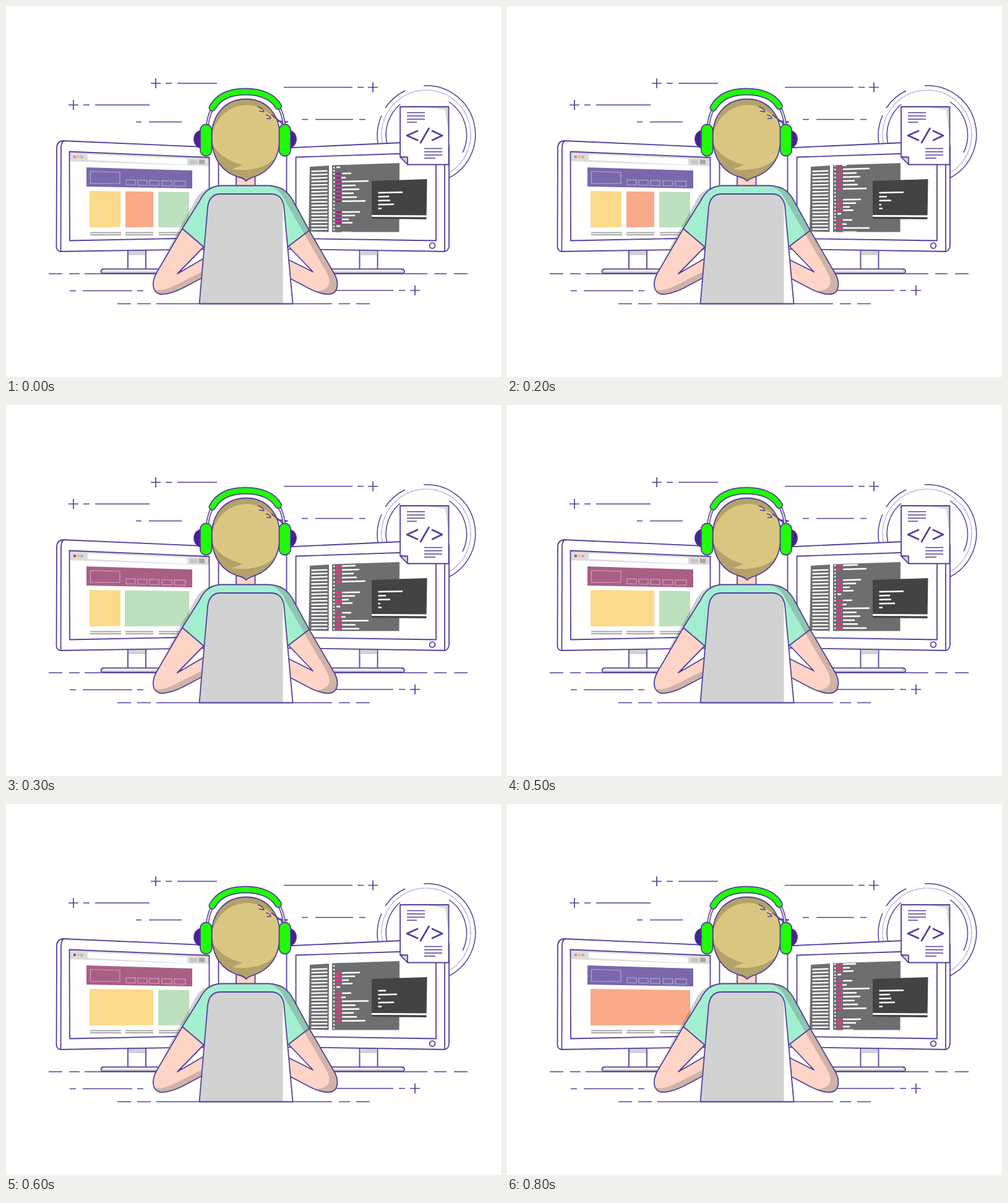
An HTML page that plays this animation: 800 px wide and 600 px high, repeating every 900 ms.

```html
<!DOCTYPE html>
<html lang="en">
<head>
<meta charset="utf-8">
<title>Developer at work</title>
<style>
html, body { margin: 0; width: 100%; height: 100%; overflow: hidden; background: #fff; }
svg { display: block; width: 100%; height: 100%; }
.ink { fill: none; stroke: #52409a; stroke-width: 1.8; stroke-linejoin: round; }
.dash { stroke-width: 1.7; }
.white { fill: #fff; }
.skin { fill: #fdd4c6; }
.shirt { fill: #a2efcf; }
.grey { fill: #d1d2d2; }
.green { fill: #21fb07; }
.shade { fill: #58595b; fill-opacity: .28; }
</style>
</head>
<body>
<svg viewBox="0 0 800 600">
  <defs>
    <clipPath id="editor"><path d="M527 257.5L636 254 635.5 365.5H527Z"/></clipPath>
    <clipPath id="hair"><path id="hairShape" d="M388 150.500C421 150.500 442.500 175 442.500 211C442.500 249 424 268 402 276Q392 279 388 283Q384 278 374 276C351 269 332.500 248 332.500 211C332.500 175 355 150.500 388 150.500Z"/></clipPath>
  </defs>

  <path id="dashes" class="ink dash"/>

  <g class="ink" style="stroke-width:1.5">
    <path d="M675 129A79 79 0 0 1 716 278M601 222A79 79 0 0 1 607 177M613 165A79 79 0 0 1 645 137"/>
    <path d="M615.500 222A65 65 0 0 1 637 159M716 155A65 65 0 0 1 738 237"/>
    <circle cx="679" cy="208" r="72" stroke-dasharray="1.2 1.6" stroke-width="1.2"/>
  </g>

  <!-- left monitor -->
  <g class="ink">
    <path class="white" d="M197 394H226V427H197Z"/>
    <path class="grey" stroke="none" d="M198 396H225V403H198Z"/>
    <rect class="grey" x="153.500" y="425.500" width="130" height="7" rx="3.500"/>
    <path class="white" stroke="none" d="M158 426.500H270V429H157Z"/>
    <path class="white" d="M92 218L343.500 229V393L88 397Q82 396 81.500 390L82 230Q82 219 92 218ZM93 218Q89 222 89 229L88.500 397"/>
  </g>
  <path fill="#dcdcdc" d="M103 236L328 245V259L103 251Z"/>
  <path fill="#fff" d="M132 240L293 247V257L132 249Z"/>
  <path fill="#c6c6c6" d="M297 249L309 249.500V256L297 255.500Z"/>
  <path fill="#a7a7a7" d="M312 248.500L321 249V256L312 255.500Z"/>
  <circle cx="117" cy="244" r="2.300" fill="#ecc176"/>
  <circle cx="122.500" cy="244.200" r="2.300" fill="#aabb9c"/>
  <g id="page"></g>
  <path class="ink" d="M102.500 235.500L328.500 245V375L103 379.500Z"/>

  <!-- right monitor -->
  <g class="ink">
    <path class="white" d="M571.500 394H600.500V427H571.500Z"/>
    <path class="grey" stroke="none" d="M572.500 396H599.500V403H572.500Z"/>
    <rect class="grey" x="500" y="425.500" width="144" height="7" rx="3.500"/>
    <path class="white" stroke="none" d="M501 426.500H639V429H501Z"/>
    <path class="white" d="M453.500 229.500L706 218Q716 219 716 230V388Q715 396 709 397L453.500 393ZM709 230V397"/>
    <path d="M468.500 244.500L695 237V379.500L468.500 376Z"/>
    <circle cx="689" cy="387.500" r="4.400"/>
  </g>
  <path fill="#6d6e70" d="M491 260L522 258 521.500 365.500 489 364.500ZM527 257.500L636 254 635.500 365.500H527Z"/>
  <path id="sidebar" stroke="#fff" stroke-width="2.300"/>
  <g id="code" clip-path="url(#editor)"></g>
  <path fill="#434344" d="M591 283L680.500 280 679.500 345 591 344Z"/>
  <path stroke="#fff" stroke-width="3" d="M591 339.500L680 340"/>
  <g id="terminal"></g>

  <!-- code document -->
  <path class="white" d="M637 163H715V257H650L637 244Z"/>
  <path fill="#d6d6d6" d="M682 164H715V206L710 168Z"/>
  <g class="ink">
    <path d="M637 163H715.500V256.500H650L637 244Z"/>
    <path class="grey" d="M637 244L649 244.500V256.500Z"/>
    <path id="docLines" stroke-width="1.500"/>
    <path style="stroke-width:2.700" d="M666 201.500L648 209.500 666 217.500M684 197L669.500 222M688 201.500L705 209.500 688 217.500"/>
  </g>

  <!-- body -->
  <path class="shade" d="M345 290C325 291 311 302 304 318L262 393 268 391 286 360 314 315C320 302 330 294 345 290Z"/>
  <g class="ink">
    <path class="skin" d="M372 272H402.500V292H372Z"/>
    <path class="skin" d="M285 360L243 432C235 447 236 463 249 466C262 467 276 461 286 456L320 438V408L277 433 320 389Z"/>
    <path class="skin" d="M490 363L530 432C539 447 537 465 523 466C511 467 500 462 490 457L456 439V410L496 430 456 388Z"/>
    <path class="shirt" d="M347 290.500H424C447 291 457 302 465 317L490 363 456 389 420 350H350L320 390 285 360 313 315C320 301 329 292 347 290.500Z"/>
  </g>
  <path class="shade" d="M240 459C252 462 264 456 277 450L318 429V438L286 456C274 462 260 467 249 466Q242 464 240 459Z"/>
  <path class="shade" d="M424 290.500C447 291 457 302 465 317L530 432C539 447 537 465 523 466C513 467 506 464 502 461C527 459 526 444 516 427L452 317C447 305 440 296 424 290.500Z"/>
  <path class="grey" d="M313 481L326 325C328 310 335 304 347 304H428C441 304 446 311 448 322L463 481Z"/>
  <path class="white" d="M447.500 313V481H463Z"/>
  <path class="ink" d="M312.500 481.500L326 325C328 310 335 304 347 304H428C441 304 446 311 449 322L463.500 481.500Z"/>

  <!-- head -->
  <use href="#hairShape" fill="#b3a26a"/>
  <path clip-path="url(#hair)" fill="#d9c781" d="M332 212C338 180 362 160 390 160C416 161 430 178 444 190V232C431 261 397 268 365 264L383 257C357 251 341 238 332 221Z"/>
  <use href="#hairShape" class="ink"/>
  <path class="ink" style="stroke-width:1.400" d="M407 163Q415 165 417 171L409 170M420 176Q427 177 428 182L421 182"/>
  <path class="ink" fill="#52409a" d="M429 176L442 186 455 187.500 444 191M438 185L448 190"/>

  <!-- headphones -->
  <path fill="#4c2095" stroke="#52409a" d="M316 201C299 202 300 229 316 230ZM457 201C474 202 473 229 457 230Z"/>
  <g fill="none" stroke-linecap="round">
    <path stroke="#52409a" stroke-width="5" d="M333 167Q327 178 325.500 193M441 164Q448 176 449.500 193"/>
    <path stroke="#dedee4" stroke-width="2.200" d="M333 167Q327 178 325.500 193M441 164Q448 176 449.500 193"/>
    <path stroke="#52409a" stroke-width="12" d="M333.500 164.500C344 145 365 138.500 387 138.500C411 138.500 431 146 440 162"/>
    <path stroke="#21fb07" stroke-width="8.600" d="M333.500 164.500C344 145 365 138.500 387 138.500C411 138.500 431 146 440 162"/>
  </g>
  <g class="ink">
    <rect class="green" x="314" y="191.500" width="18.500" height="51" rx="9"/>
    <rect class="green" x="441.500" y="191.500" width="18.500" height="51" rx="9"/>
  </g>
</svg>
<script>
const el = id => document.getElementById(id);
const hline = (y, x1, x2, slope = 0) => `M${x1} ${y}L${x2} ${y + slope * (x2 - x1)}`;
const hlines = (y, ...spans) => spans.map(([a, b]) => hline(y, a, b)).join('');
const plus = (x, y) => `M${x - 8} ${y}h16M${x} ${y - 8}v16`;
const shape = (fill, d) => `<path fill="${fill}" d="${d}"/>`;
const strokes = (color, width, d) => `<path fill="none" stroke="${color}" stroke-width="${width}" d="${d}"/>`;

el('dashes').setAttribute('d', [
  plus(242, 125), hlines(125, [258, 268], [277, 341]),
  plus(109, 160), hlines(160, [125, 135], [144, 232]),
  hlines(187.5, [210, 219], [231, 284]),
  hlines(131.5, [449, 560], [568, 578]), plus(593, 131.5),
  hlines(183.5, [478, 488], [500, 561], [571, 581]),
  hlines(433, [69, 91], [102, 119], [127, 681], [692, 712], [724, 746]),
  hlines(460.5, [103, 113], [124, 204], [212, 222]),
  hlines(460, [533, 626], [635, 645]), plus(661, 460),
  hlines(481.5, [180, 202], [212, 234], [243, 527], [538, 556], [566, 588])
].join(''));

el('docLines').setAttribute('d', [0, 1, 2, 3].map(i =>
  hline(172.5 + i * 5.2, 648, i < 3 ? 677 : 664) +
  hline(230.500 + i * 5.2, 676, i < 3 ? 705 : 694)).join(''));

el('sidebar').setAttribute('d', Array.from({ length: 18 }, (_, i) =>
  hline(267.5 + i * 5.5, 493.5, 519.5, -.035 * (1 - i / 18))).join(''));

const YELLOW = '#fcda8b', ORANGE = '#f8aa8a', GREEN = '#bde0bf';
const LAYOUTS = {
  three: [[YELLOW, 135, 185], [ORANGE, 193, 238], [GREEN, 246, 296]],
  wideRight: [[YELLOW, 135, 185], [GREEN, 192, 296]],
  wideLeft: [[YELLOW, 135, 238], [GREEN, 246, 296]],
  full: [[ORANGE, 135, 296]]
};
const OUTPUT = {
  a: [641, 619, 621, 627, 607],
  b: [641, 614, 621, 605, 607],
  c: [614, 632, 605, 627, 607]
};
// page layout, magenta theme, terminal output; one row per 100 ms
const STEPS = [
  ['three', 0, 'a'], ['three', 0, 'a'], ['three', 0, 'b'],
  ['wideRight', 1, 'b'], ['wideRight', 1, 'a'], ['wideLeft', 1, 'a'],
  ['wideLeft', 1, 'c'], ['full', 0, 'c'], ['full', 0, 'a']
];

const quad = (x1, x2, y1, y2, y3, y4) => `M${x1} ${y1}L${x2} ${y2}V${y3}L${x1} ${y4}Z`;

function page(layout, magenta) {
  const topAt = x => 299 + (x - 135) * .0125;
  const buttons = [[194, 209], [213, 228], [232, 247], [252, 268], [272, 290]];
  const cards = LAYOUTS[layout].map(([color, a, b]) =>
    shape(color, quad(a, b, topAt(a), topAt(b), 357.5, 358.3)));
  const captions = [[136, 186], [193, 238], [247, 296]];
  return `<circle cx="111" cy="244" r="2.3" fill="${magenta ? '#9b566f' : '#ea8389'}"/>` +
    shape(magenta ? '#a95e86' : '#7968ab', quad(130, 301, 261, 266, 295, 292)) +
    strokes(magenta ? '#d0a0b8' : '#b4a6cf', 1.2, quad(136.5, 184, 267.5, 269, 287, 287) +
      buttons.map(([a, b]) => {
        const y = 281 + (a - 194) * .025;
        return quad(a, b, y, y + .4, y + 8.500, y + 8.2);
      }).join('')) +
    cards.join('') +
    strokes('#a8a8a8', 1.8, hlines(366.5, ...captions) + hlines(370, ...captions));
}

// baseline and right end of each code line; 0 = empty line
const CODE = [
  [271, 558], [277.7, 549], [284, 586], [290.5, 565], [296.7, 571],
  [303, 562], [309.3, 567], [315.7, 581], [321.5, 0], [327.3, 0],
  [333.2, 572], [339, 564], [345, 554], [350.5, 560], [356, 540], [361, 0]
];
const CODE_PERIOD = 95;

function code(step) {
  let white = '', pink = '';
  for (const shift of [-CODE_PERIOD, 0, CODE_PERIOD]) {
    for (const [base, end] of CODE) {
      const y = base + shift - step * 10;
      if (y < 253 || y > 369) continue;
      const slope = -.03 * (365 - y) / 109;
      white += hline(y + .5, 529, 531.2);
      if (end === 540) white += hline(y, 534, end, slope);
      else if (end) {
        pink += hline(y + .4, 533, 541.8, slope);
        white += hline(y, end < 550 ? 542 : 543, end, slope);
      }
    }
  }
  return strokes(step ? '#ee2f87' : '#b8128f', 2.8, pink) + strokes('#fff', 2.5, white);
}

const terminal = name => strokes('#fff', 2.500,
  OUTPUT[name].map((end, i) => hline(302 + i * 6.4, 601.5, end, -.02)).join(''));

const scenes = STEPS.map(([layout, magenta, output], i) =>
  ({ page: page(layout, magenta), code: code(i), terminal: terminal(output) }));

const start = performance.now();
let shown = -1;
function render() {
  const step = Math.floor((performance.now() - start) % 900 / 100);
  if (step !== shown) {
    for (const [id, markup] of Object.entries(scenes[step])) el(id).innerHTML = markup;
    shown = step;
  }
  requestAnimationFrame(render);
}
render();
</script>
</body>
</html>
```
